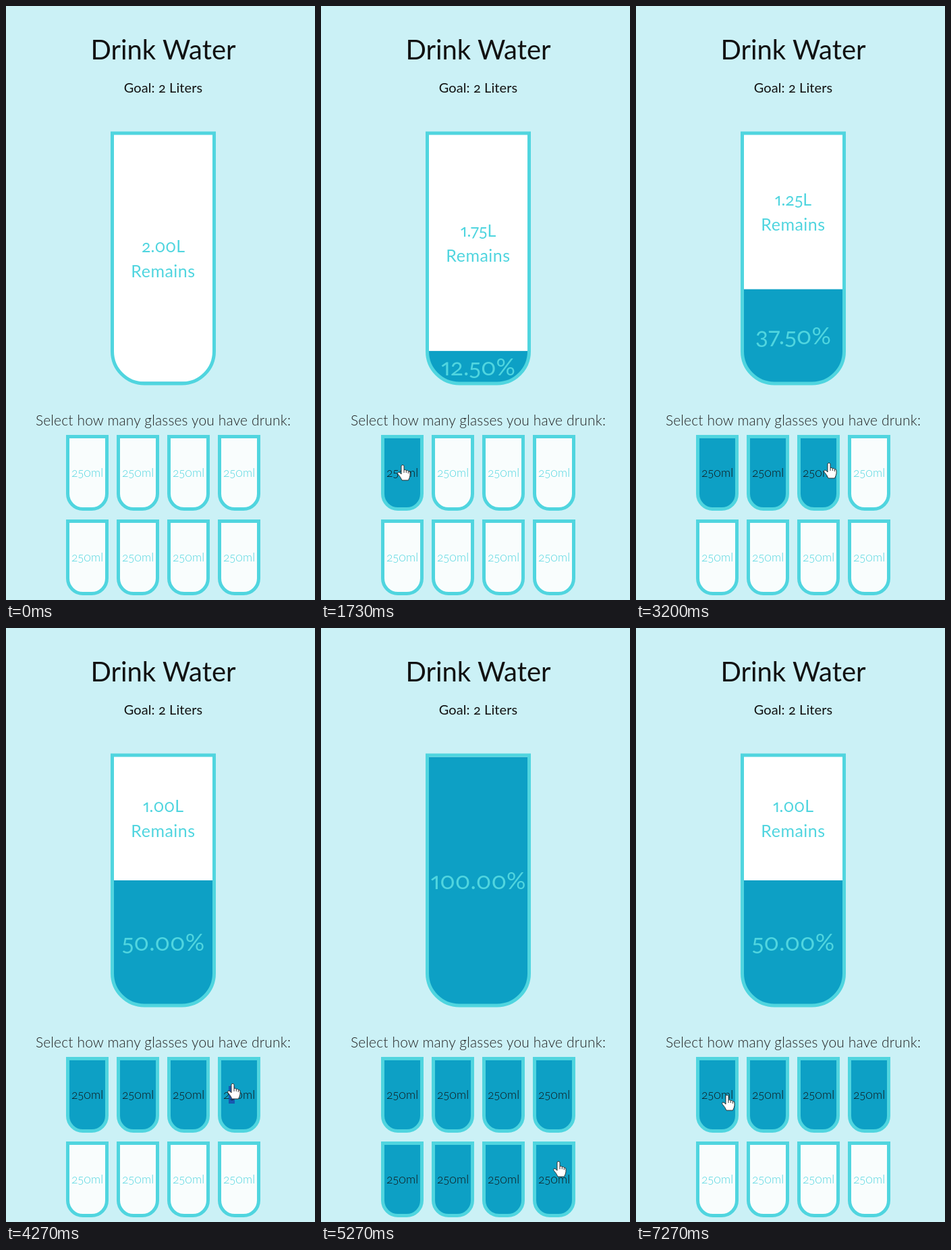
An HTML page for the animation above (7.34 s loop, 458x878 px).

```html
<!DOCTYPE html>
<html lang="en">
<head>
<meta charset="utf-8">
<title>Drink Water</title>
<style>
  html, body { margin: 0; height: 100%; overflow: hidden; background: #cbf1f6; }
  svg { display: block; font-family: Lato, "Open Sans", sans-serif; font-variant-numeric: oldstyle-nums proportional-nums; }
  text { text-anchor: middle; white-space: pre; }
  .edge { fill: none; stroke: #50d5df; stroke-width: 5; }
  .aqua { fill: #50d5df; }
  .thin { font-weight: 300; }
</style>
</head>
<body>
<svg id="stage" width="458" height="878" viewBox="0 0 458 878"></svg>
<script>
const LOOP = 7340, FADE = 300;
const WATER = '#0da0c5', CUP = { x: 155, y: 185.5, w: 156, h: 375, r: 50 };
const TOP = CUP.y + 5, DEPTH = CUP.h - 10;

// [time, glasses drunk]
const clicks = [[0, 0], [1400, 1], [2870, 3], [3800, 4], [4850, 8], [6522, 4]];
// [time, x, y] of the fingertip
const route = [
  [300, 350, 884], [870, 151, 697], [1070, 120, 679], [1730, 121, 678], [2060, 121, 678],
  [2200, 154, 684], [2600, 278, 674], [3200, 286, 675], [3400, 290, 676], [3600, 338, 676],
  [4270, 336, 673], [4450, 337, 676], [4780, 352, 790], [5270, 352, 788], [5670, 352, 788],
  [6330, 336, 688], [6720, 336, 688], [7200, 139, 688], [7270, 135, 690]
];

const stage = document.getElementById('stage');

function add(tag, attrs, parent = stage) {
  const el = document.createElementNS('http://www.w3.org/2000/svg', tag);
  for (const key in attrs) el.setAttribute(key, attrs[key]);
  return parent.appendChild(el);
}

function label(text, x, y, size, attrs, parent) {
  const el = add('text', { x, y, 'font-size': size, ...attrs }, parent);
  el.textContent = text;
  return el;
}

// Outline of a glass along the middle of its border
function glass({ x, y, w, h, r }) {
  const a = r - 2.5, side = h - 5 - a, base = w - 5 - 2 * a;
  return `M${x + 2.5} ${y + 2.5}v${side}a${a} ${a} 0 0 0 ${a} ${a}h${base}a${a} ${a} 0 0 0 ${a} ${-a}v${-side}z`;
}

label('Drink Water', 233, 79, 40, { fill: '#111' });
label('Goal: 2 Liters', 233, 128, 20, { fill: '#111', 'letter-spacing': .1 });
label('Select how many glasses you have drunk:', 233, 620, 21, { class: 'thin', fill: '#222', 'letter-spacing': .15 });

const outline = glass(CUP);
add('path', { d: outline }, add('clipPath', { id: 'inside' }));
const cup = add('g', { 'clip-path': 'url(#inside)' });
add('path', { d: outline, fill: '#fff' }, cup);
const litres = label('', 233, 0, 25, { class: 'aqua' }, cup);
const remains = label('Remains', 233, 0, 25, { class: 'aqua', 'letter-spacing': .5 }, cup);
const water = add('rect', { x: CUP.x, width: CUP.w, fill: WATER }, cup);
const percent = label('', 233, 0, 35.5, { class: 'aqua' }, cup);
add('path', { d: outline, class: 'edge' });

const minis = Array.from({ length: 8 }, (_, i) => {
  const x = 89 + i % 4 * 75, y = 634 + (i >> 2) * 125;
  const body = add('path', { d: glass({ x, y, w: 63, h: 112, r: 25 }), class: 'edge' });
  const mark = i === 3 ? add('rect', { x: 330, y: 677, width: 9, height: 26, fill: '#1858b0' }) : null;
  return { body, mark, text: label('250ml', x + 31.5, y + 62, 17.5, { class: 'thin' }) };
});

const hand = add('path', {
  d: 'M-2 1.5Q0-1 2 1.5V8Q4 6.5 5.3 8.6Q7.5 7.5 8.3 9.7Q11 9 11 12V16Q10.5 19 8.5 23H-1Q-3 18-6.5 14.5Q-8.5 11.5-6 11Q-4 11-2 14Z' +
     'M2 8V12M5.3 8.6V12M8.3 9.7V13',
  fill: '#fff', stroke: '#333', 'stroke-width': 1, 'stroke-linejoin': 'round'
});

const bezier = (a, b, u) => 3 * a * u * (1 - u) ** 2 + 3 * b * u * u * (1 - u) + u ** 3;

// The CSS "ease" curve
function ease(p) {
  if (p >= 1) return 1;
  let low = 0, high = 1;
  for (let i = 0; i < 20; i++) {
    const mid = (low + high) / 2;
    if (bezier(.25, .25, mid) < p) low = mid; else high = mid;
  }
  return bezier(.1, 1, low);
}

const mix = (from, to, p) => `color-mix(in srgb, ${to} ${p * 100}%, ${from})`;
const show = (el, on) => el.style.visibility = on ? 'visible' : 'hidden';

function drawCups(t) {
  const at = clicks.findLastIndex(c => c[0] <= t);
  const [start, count] = clicks[at], before = at ? clicks[at - 1][1] : 0;
  const p = ease((t - start) / FADE);
  const height = DEPTH * (before + (count - before) * p) / 8;
  const surface = TOP + DEPTH - height, middle = (TOP + surface) / 2;

  water.setAttribute('y', surface);
  water.setAttribute('height', height + 5);
  percent.setAttribute('y', surface + height / 2 + 13);
  percent.textContent = count ? (count * 12.5).toFixed(2) + '%' : '';
  litres.setAttribute('y', middle - 9.5);
  remains.setAttribute('y', middle + 27.5);
  litres.textContent = (2 - count / 4).toFixed(2) + 'L';
  show(litres, count < 8);
  show(remains, count < 8);

  minis.forEach(({ body, mark, text }, i) => {
    const was = i < before, full = i < count;
    const level = was === full ? +full : full ? p : 1 - p;
    body.style.fill = mix('#f9fdfd', WATER, level);
    text.style.fill = mix('#50d5df', '#111', level);
    if (mark) show(mark, t > 3900 && t < 4720);
  });
}

function drawHand(t) {
  show(hand, t >= route[0][0]);
  const next = route.findIndex(r => r[0] > t);
  const b = next < 0 ? route.at(-1) : route[next];
  const a = next > 0 ? route[next - 1] : b;
  const p = a === b ? 0 : (t - a[0]) / (b[0] - a[0]);
  const [x, y] = [1, 2].map(k => a[k] + (b[k] - a[k]) * p);
  hand.setAttribute('transform', `translate(${x} ${y})`);
}

function frame() {
  const t = performance.now() % LOOP;
  drawCups(t);
  drawHand(t);
  requestAnimationFrame(frame);
}
frame();
</script>
</body>
</html>
```
